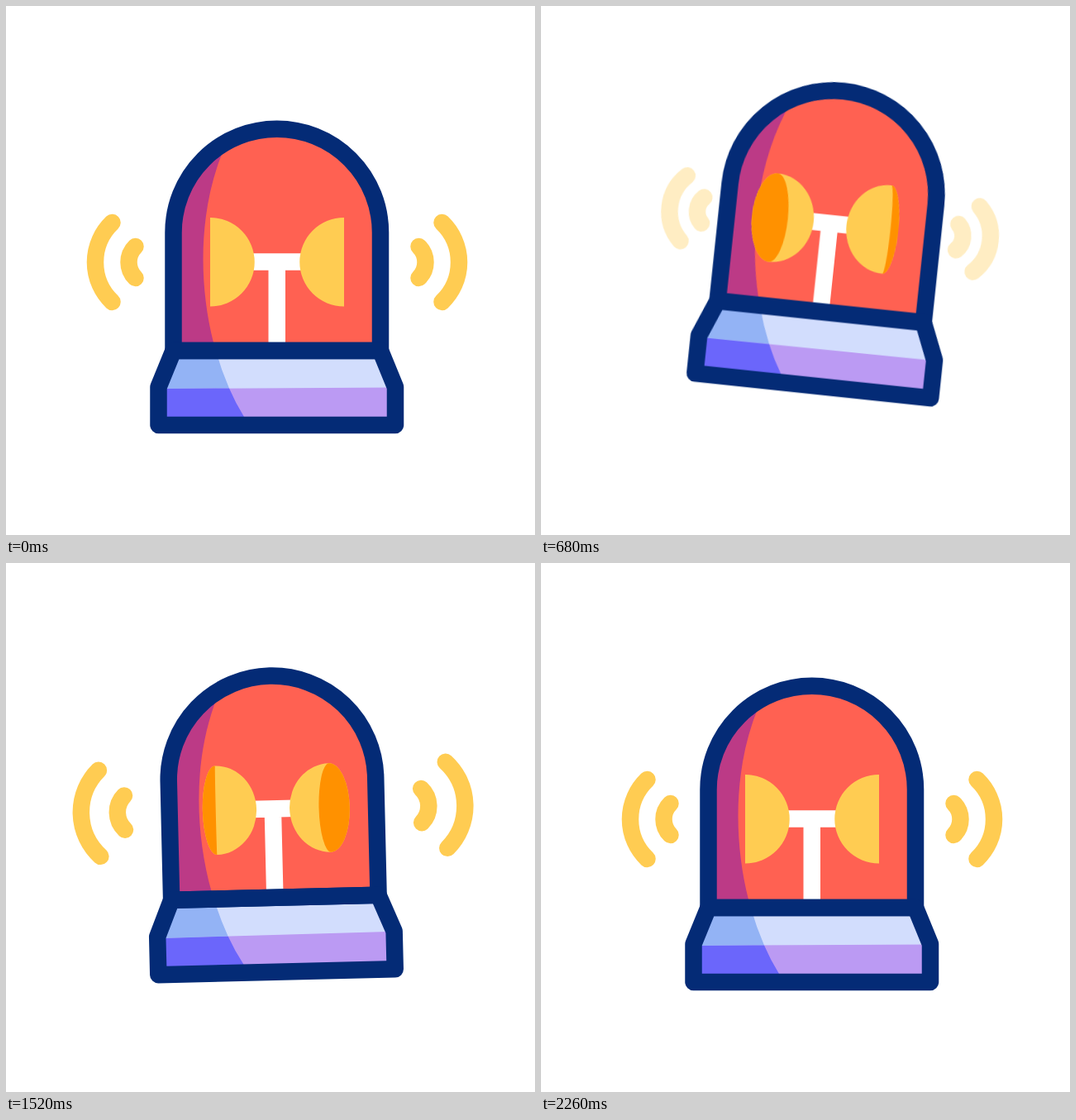
Write an HTML page that moves like this. It is 640 by 640 pixels and loops after 2300 ms.

```html
<!DOCTYPE html>
<html lang="en">
<head>
<meta charset="utf-8">
<title>Siren</title>
<style>
  html, body { margin: 0; width: 100%; height: 100%; overflow: hidden; background: #fff; }
  svg { display: block; width: 100%; height: 100%; }
  .wave { fill: none; stroke: #ffcc52; stroke-width: 20.5; stroke-linecap: round; }
  .edge { fill: none; stroke: #042b76; stroke-width: 20.5; stroke-linejoin: round; }
  .cup { fill: #ffcc52; }
  .face { fill: #ff9100; }
</style>
</head>
<body>
<svg viewBox="0 0 640 640">
  <defs>
    <path id="dome" d="M202.5 417V274A125.25 125.25 0 0 1 453 274V417Z"/>
    <path id="base" d="M202.5 417L184.5 461V507H471V461L453 417Z"/>
    <clipPath id="inDome"><use href="#dome"/></clipPath>
    <clipPath id="inBase"><use href="#base"/></clipPath>
  </defs>
  <g id="siren">
    <g id="waves">
      <path class="wave"/>
      <path class="wave" transform="translate(656 0) scale(-1 1)"/>
    </g>
    <g clip-path="url(#inDome)">
      <use href="#dome" fill="#ff6152"/>
      <path fill="#bc3a86" d="M190 130H281Q268 157 260 182C232 255 234 340 251 407L254 420H190Z"/>
      <path fill="none" stroke="#fff" stroke-width="20.5" d="M290 309.5H366M327.75 309.5V417"/>
      <g class="lamp"><path class="cup"/><path class="face"/></g>
      <g class="lamp" transform="translate(656 0) scale(-1 1)"><path class="cup"/><path class="face"/></g>
    </g>
    <g clip-path="url(#inBase)">
      <path fill="#d2ddfd" d="M180 410H480V470H180Z"/>
      <path fill="#bb9af3" d="M180 463L480 461.5V515H180Z"/>
      <path fill="#93b3f5" d="M180 410H252Q259 437 270 462.5L180 463Z"/>
      <path fill="#6b66fb" d="M180 463L270 462.5Q278 481 288 497L295 515H180Z"/>
    </g>
    <use href="#dome" class="edge"/>
    <use href="#base" class="edge"/>
  </g>
</svg>
<script>
const LOOP = 2300;
const $ = id => document.getElementById(id);
const siren = $('siren'), waves = $('waves');
const arcs = waves.querySelectorAll('path');
const lamps = document.querySelectorAll('.lamp');

const clamp = x => Math.min(1, Math.max(0, x));
const span = (t, from, to) => clamp((t - from) / (to - from));
const sine = u => (1 - Math.cos(Math.PI * u)) / 2;
const soft = u => (u + sine(u)) / 2;

// [time, degrees]
const tilts = [[0, 0], [400, -7], [715, 7], [1005, -6], [1305, 5.8], [1630, -4.4], [1880, 2.5], [2180, 0], [LOOP, 0]];

function tilt(t) {
  const i = tilts.findIndex(k => k[0] > t);
  const [t0, a] = tilts[i - 1], [t1, b] = tilts[i];
  const u = span(t, t0, t1);
  return a + (b - a) * (i === 1 || i === 7 ? sine(u) : soft(u));
}

function lift(t) {
  return t < 400 ? -62 * sine(t / 400)
                 : -62 * (1 - Math.sin(span(t, 400, 2290) * Math.PI / 2));
}

// Size and opacity of the sound waves
function pulse(t) {
  if (t < 600) return [1 + 0.243 * (t / 460) ** 2, 1 - span(t, 495, 595)];
  for (const start of [638, 1240]) {
    const age = t - start;
    if (age >= 0 && age < 560)
      return [0.78 + 0.00109 * age, span(age, 0, 120) * (1 - span(age, 460, 560))];
  }
  const u = span(t, 1850, 2260);
  return [0.78 + 0.22 * Math.sin(u * Math.PI / 2), span(t, 1850, 2000)];
}

function drawWaves(t) {
  const [size, alpha] = pulse(t);
  const arc = (x, h, r) =>
    `M${252 - x * size} ${310 - h * size}a${r * size} ${r * size} 0 0 0 0 ${2 * h * size}`;
  const d = arc(123.5, 48, 66.4) + arc(95.5, 19, 26.6);
  arcs.forEach(p => p.setAttribute('d', d));
  waves.setAttribute('opacity', alpha);
}

// Elliptic side of a lamp; a positive bulge points outwards (left)
const side = (bulge, dy) =>
  `a${Math.max(0.01, Math.abs(bulge))} 53.75 0 0 ${(bulge > 0) === (dy < 0) ? 1 : 0} 0 ${dy}`;

function drawLamps(t) {
  const open = sine(span(t, 0, 400)) * (1 - sine(span(t, 1800, 2240)));
  const swing = -9.2 * Math.cos((t - 420) / 595 * 2 * Math.PI);
  const x = 247 + 12 * open, depth = 53.75 - 4.75 * open;
  lamps.forEach((lamp, i) => {
    const a = i ? -swing : swing;
    const outer = open * (20 + 0.7 * a);
    const inner = -open * (6.6 + 1.3 * a);
    const [cup, face] = lamp.children;
    const top = `M${x} 256`;
    cup.setAttribute('d', top + side(-depth, 107.5) + side(outer, -107.5) + 'z');
    face.setAttribute('d', top + side(inner, 107.5) + side(outer, -107.5) + 'z');
    face.setAttribute('visibility', open > 0.002 ? 'visible' : 'hidden');
  });
}

function draw(t) {
  siren.setAttribute('transform', `translate(0 ${lift(t)}) rotate(${tilt(t)} 328 517)`);
  drawWaves(t);
  drawLamps(t);
}

let begin;
function tick(now) {
  begin ??= now;
  draw(Math.max(0, now - begin) % LOOP);
  requestAnimationFrame(tick);
}
draw(0);
requestAnimationFrame(tick);
</script>
</body>
</html>
```
